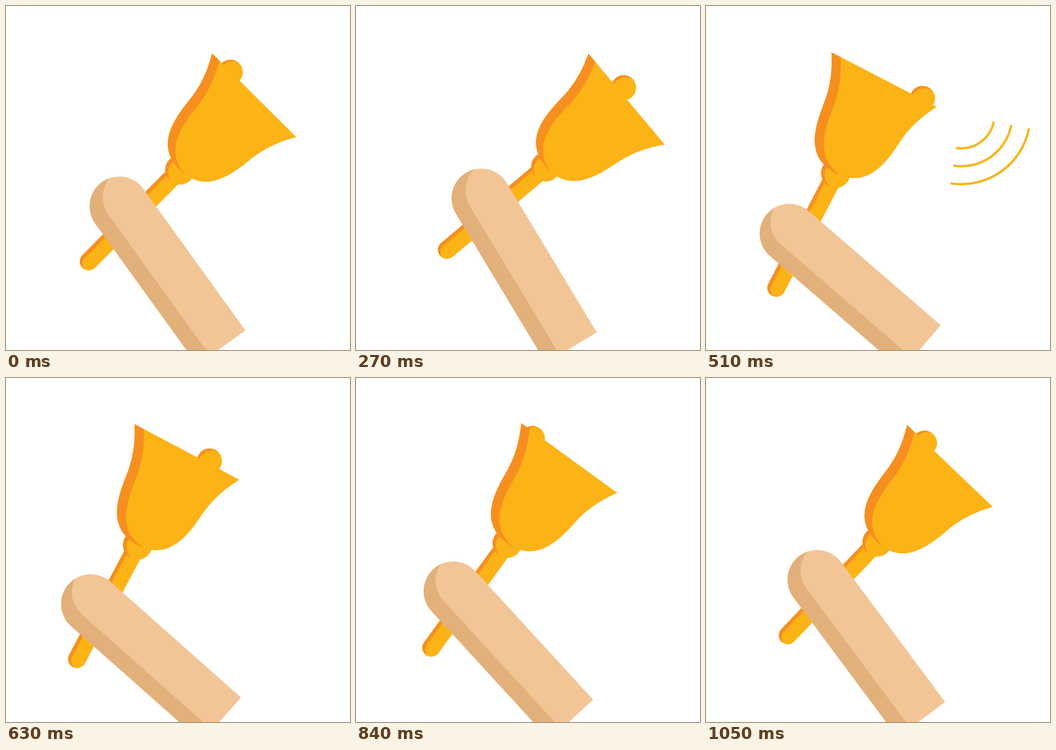
An HTML page with a canvas that plays this animation: 748x748 px, repeating every 1.08 s.

```html
<!DOCTYPE html>
<html lang="en">
<head>
<meta charset="utf-8">
<title>Hand bell</title>
<style>
  html, body { margin: 0; height: 100%; overflow: hidden; background: #fff; }
  canvas { display: block; }
</style>
</head>
<body>
<canvas width="748" height="748"></canvas>
<script>
const ctx = document.querySelector('canvas').getContext('2d');
const LOOP = 1080, STEP = 30, DEG = Math.PI / 180;
const YELLOW = '#fcb316', ORANGE = '#f68f20', SKIN = '#f2c596', SKIN_DARK = '#e2b07a';
const GRIP = 380, ARM = 379.5, ARM_R = 64.5;

// time, arm angle, bell angle, grip x, grip y
const swing = [
  [0, 54.2, 44.85, 271.6, 463.4],
  [210, 64.3, 55.55, 323.8, 432],
  [390, 48.18, 38.87, 244, 475.9],
  [540, 39.05, 24.5, 204.8, 502.9],
  [840, 47.45, 36.03, 240.1, 481.3],
  [LOOP, 54.2, 44.85, 271.6, 463.4]
];

// time, clapper x, y in the bell's own space
const clapperKeys = [
  [0, -72, 1], [210, -79.5, -1.5], [270, -23, -11], [390, 92.7, -2],
  [570, 93, -2], [630, 52.4, -5.6], [740, -24, -10], [840, -89.7, 12.7],
  [LOOP, -72, 1]
];

// sound arcs: centre, middle direction, first and last moment
const waves = [
  { x: 555, y: 237.5, dir: 55, from: 375, to: 615 },
  { x: 383.5, y: 131.5, dir: -181, from: 860, to: 1045 }
];

const bell = new Path2D(
  'M-129 0C-110 33-96 66-92 112C-86 162-75 229 0 229C75 229 86 162 92 112C96 66 110 33 129 0Z');
const knob = circle(0, 229, 32);
const ball = circle(0, 0, 27.2);
const handle = new Path2D('M-19.5 230V510A19.5 19.5 0 0 0 19.5 510V230Z');
const arm = new Path2D(
  `M${ARM} ${-ARM_R}H0A${ARM_R} ${ARM_R} 0 0 0 0 ${ARM_R}H${ARM}Z`);

function circle(x, y, r) {
  const path = new Path2D();
  path.arc(x, y, r, 0, 2 * Math.PI);
  return path;
}

function sample(keys, t) {
  const i = keys.findIndex(k => k[0] > t);
  const a = keys[i - 1], b = keys[i];
  const p = (t - a[0]) / (b[0] - a[0]);
  return a.slice(1).map((v, n) => v + (b[n + 1] - v) * p);
}

function place(x, y, angle, draw) {
  ctx.save();
  ctx.translate(x, y);
  ctx.rotate(angle * DEG);
  draw();
  ctx.restore();
}

// Fills a shape and darkens the part its shifted copy leaves uncovered.
function shaded(path, dx, dy, light, dark) {
  ctx.fillStyle = light;
  ctx.fill(path);
  const rest = new Path2D();
  rest.rect(-900, -900, 1800, 1800);
  rest.addPath(path, new DOMMatrix([1, 0, 0, 1, dx, dy]));
  ctx.save();
  ctx.clip(path);
  ctx.fillStyle = dark;
  ctx.fill(rest, 'evenodd');
  ctx.restore();
}

function drawWave({ x, y, dir, from, to }, t) {
  ctx.strokeStyle = YELLOW;
  ctx.lineWidth = 5;
  for (let i = 0; i < 3; i++) {
    const alpha = Math.min(1, (t - from - 45 * i) / 45, (to - t) / 45);
    if (alpha <= 0) continue;
    ctx.globalAlpha = alpha;
    ctx.beginPath();
    ctx.arc(x, y, 72 + 39 * i, (dir - 44) * DEG, (dir + 44) * DEG);
    ctx.stroke();
  }
  ctx.globalAlpha = 1;
}

function draw(t) {
  const [armAngle, bellAngle, gx, gy] = sample(swing, t);
  const [cx, cy] = sample(clapperKeys, t);
  ctx.fillStyle = '#fff';
  ctx.fillRect(0, 0, 748, 748);
  for (const wave of waves) drawWave(wave, t);

  place(gx, gy, bellAngle, () => {
    ctx.translate(0, -GRIP);
    place(cx, cy, Math.atan(cx / 250) / DEG + 5,
      () => shaded(ball, 6, 0, YELLOW, ORANGE));
    shaded(handle, 8, 0, YELLOW, ORANGE);
    shaded(knob, 9, 0, YELLOW, ORANGE);
    shaded(bell, 22, -1, YELLOW, ORANGE);
  });

  place(468.2, 743, armAngle, () => {
    ctx.translate(-ARM, 0);
    shaded(arm, 1, -34.5, SKIN, SKIN_DARK);
  });
}

function frame() {
  const t = performance.now() % LOOP;
  draw(Math.floor(t / STEP) * STEP);
  requestAnimationFrame(frame);
}
frame();
</script>
</body>
</html>
```
